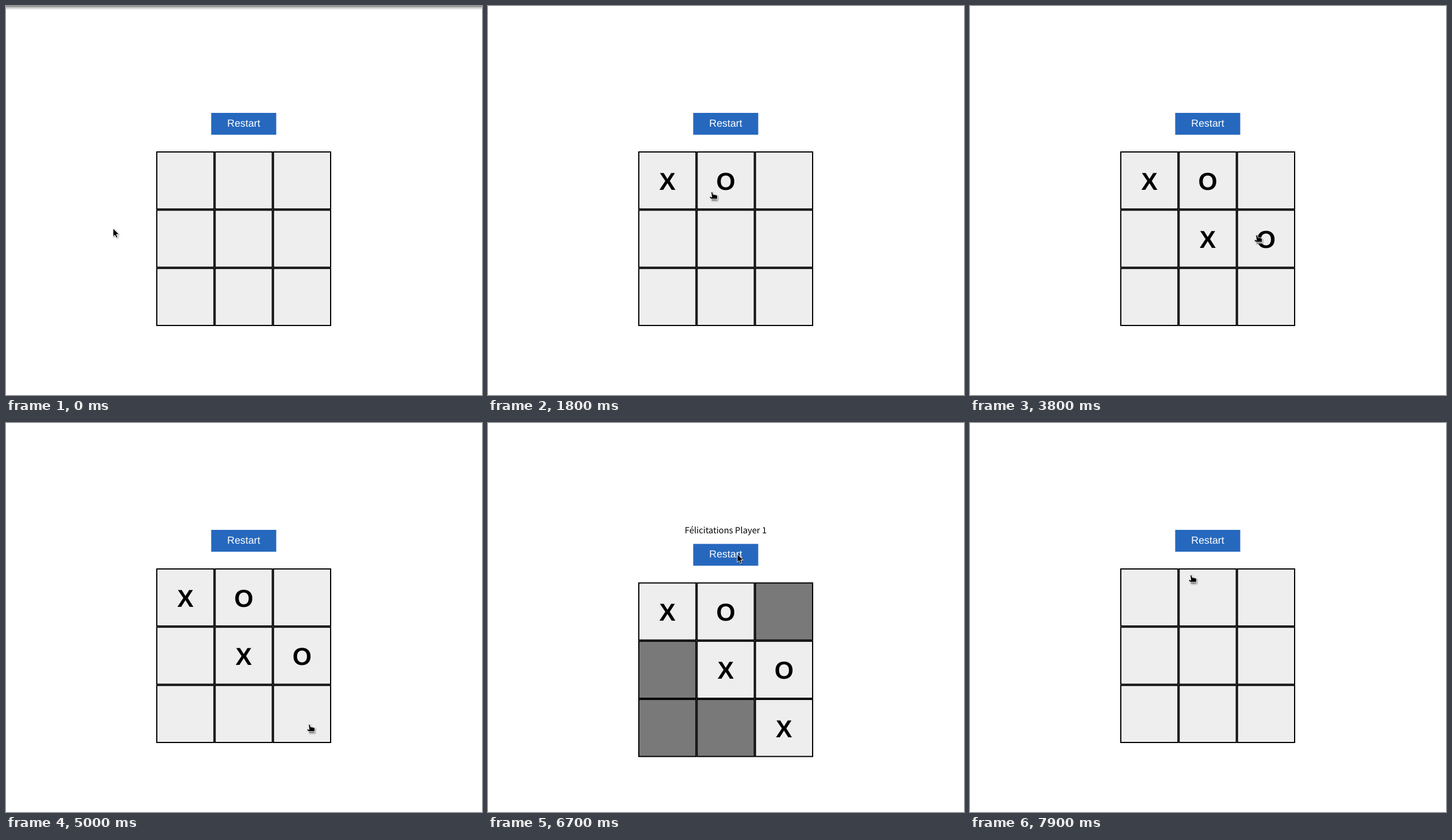
An HTML page that plays this animation: 827 px wide and 677 px high, repeating every 8000 ms.

```html
<!DOCTYPE html>
<html lang="fr">
<head>
<meta charset="utf-8">
<title>Tic-tac-toe</title>
<style>
  html, body { margin: 0; width: 100%; height: 100%; overflow: hidden; background: #fff; }
  svg { display: block; }
  text { text-anchor: middle; text-rendering: geometricPrecision; }
  .label { font: 17.8px "Liberation Sans", Arial, sans-serif; fill: #fff; }
  .caption { font: 14.8px "Noto Sans CJK JP", "Noto Sans CJK SC", "Noto Sans CJK", sans-serif; }
  .mark { font: bold 42.67px "Liberation Sans", Arial, sans-serif; }
  .cell { stroke: #000; stroke-width: 2; }
</style>
</head>
<body>
<svg width="827" height="677" viewBox="0 0 827 677">
  <defs>
    <linearGradient id="shade" x2="0" y2="1">
      <stop offset="0" stop-color="#777"/>
      <stop offset=".35" stop-color="#c4c4c4"/>
      <stop offset="1" stop-color="#fff"/>
    </linearGradient>
    <filter id="soft" x="-50%" y="-50%" width="200%" height="200%">
      <feDropShadow dx="1" dy="1" stdDeviation=".8" flood-opacity=".45"/>
    </filter>
  </defs>
  <rect id="top" width="827" height="7" fill="url(#shade)"/>
  <text id="caption" class="caption" x="413" y="192">Félicitations Player 1</text>
  <g id="game">
    <rect x="356.5" y="186" width="113" height="38" fill="#2668be"/>
    <text class="label" x="413" y="210">Restart</text>
    <g id="board"></g>
  </g>
  <g filter="url(#soft)" stroke="#fff" stroke-linejoin="round">
    <path id="arrow" stroke-width=".9" d="M0 0V14.6L3.3 11.5L5.5 16.4L8 15.3L5.9 10.6H10.4Z"/>
    <path id="hand" stroke-width=".8" d="M-1.3 0Q0-1.2 1.2 .2L2.3 4.2L4.2 3.9L5.4 4.7L7 4.5L8 5.4Q9.4 5 9.5 6.6V12H-1L-4 9.2Q-4.2 7.4-2.4 7.7L-.2 9ZM-1 12.4H9.3V14.2H-1Z"/>
  </g>
</svg>
<script>
const LOOP = 8000, STEP = 100, SIZE = 304 / 3, LEFT = 261, TOP = 253;
const WIN = 5700, RESET = 7200, DROP = 24.4;
const $ = id => document.getElementById(id);

// X and O take turns: cell and time of each move
const moves = [[0, 600], [1, 1800], [4, 2800], [5, 3800], [8, WIN]];

// pointer glides: start time, number of steps, end point
const glides = [
  [100, 3, 289, 324], [1200, 2, 389, 324], [2200, 4, 433, 409], [3100, 3, 498, 399],
  [4500, 2, 495, 404], [4800, 1, 473, 426], [4900, 2, 527, 525],
  [6200, 6, 433, 228], [7700, 3, 384, 265]
];

function add(tag, attrs) {
  const el = document.createElementNS("http://www.w3.org/2000/svg", tag);
  for (const key in attrs) el.setAttribute(key, attrs[key]);
  return $("board").appendChild(el);
}

const cells = Array.from({ length: 9 }, (_, i) => {
  const x = LEFT + i % 3 * SIZE, y = TOP + Math.floor(i / 3) * SIZE;
  return {
    box: add("rect", { class: "cell", x: x + 1, y: y + 1, width: SIZE - 2, height: SIZE - 2 }),
    mark: add("text", { class: "mark", x: x + SIZE / 2, y: y + 66.5 })
  };
});

const show = (el, on) => el.setAttribute("visibility", on ? "visible" : "hidden");
const ease = k => k * k * (3 - 2 * k);

function pointer(t) {
  let x = 186, y = 387;
  for (const [start, steps, endX, endY] of glides) {
    if (t < start) break;
    const k = ease(Math.min(1, (Math.floor((t - start) / STEP) + 1) / steps));
    x += (endX - x) * k;
    y += (endY - y) * k;
  }
  return [x, y];
}

function draw(t) {
  const won = t >= WIN && t < RESET, drop = won ? DROP : 0;
  show($("top"), t < moves[0][1]);
  show($("caption"), won);
  $("game").setAttribute("transform", `translate(0 ${drop})`);
  cells.forEach(({ box, mark }, i) => {
    const turn = moves.findIndex(([cell, at]) => cell === i && t >= at && t < RESET);
    mark.textContent = turn < 0 ? "" : "XO"[turn % 2];
    box.setAttribute("fill", won && turn < 0 ? "#797979" : "#eee");
  });

  const [x, y] = pointer(t), side = 3 * SIZE;
  const over = x > LEFT && x < LEFT + side && y > TOP + drop && y < TOP + drop + side;
  show($("arrow"), !over);
  show($("hand"), over);
  $(over ? "hand" : "arrow").setAttribute("transform", `translate(${x} ${y})`);
}

function tick() {
  draw(performance.now() % LOOP);
  requestAnimationFrame(tick);
}
tick();
</script>
</body>
</html>
```
